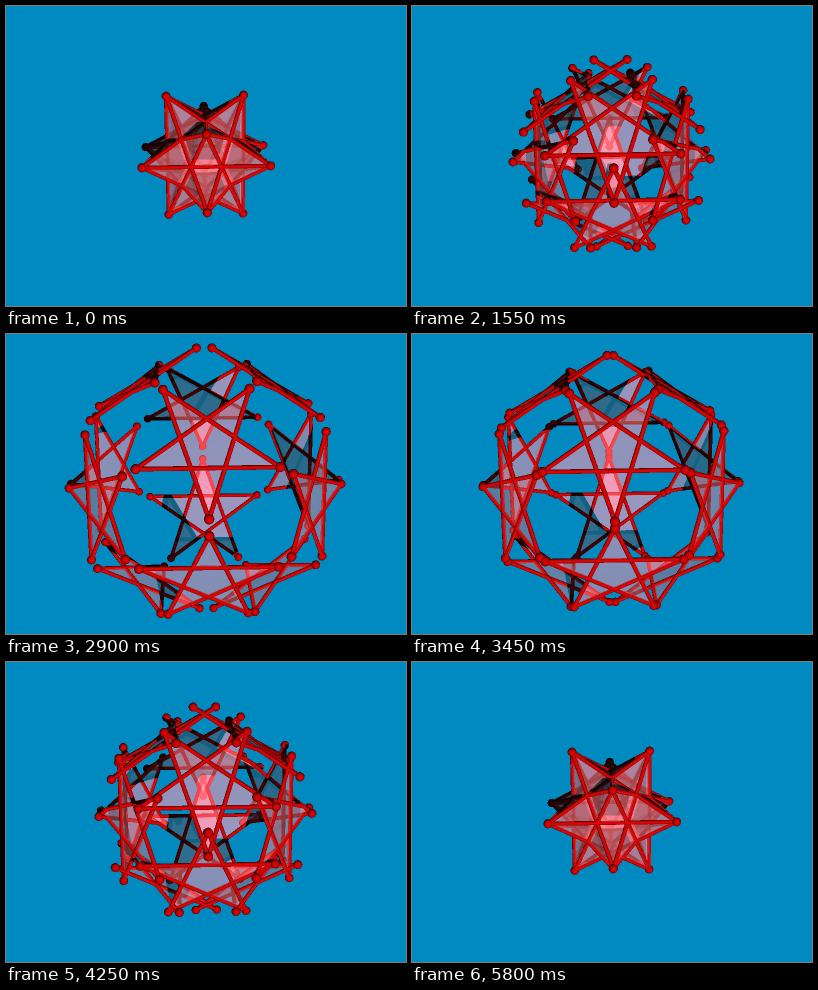
An HTML page with a canvas for the animation above (6100 ms loop, 400 px wide and 300 px high).

```html
<!DOCTYPE html>
<html lang="en">
<head>
<meta charset="utf-8">
<title>Exploding star polyhedron</title>
<style>
  html, body { margin: 0; width: 100%; height: 100%; overflow: hidden; background: #008ac0; }
  canvas { display: block; width: 400px; height: 300px; }
</style>
</head>
<body>
<canvas id="stage" width="400" height="300"></canvas>
<script>
const W = 400, H = 300, SS = 2;
const LOOP = 6100, HOLD = 300, STEP = 50, PEAK = 55;
const CX = 199.4, CY = 150, SIZE = 64.6, CAM = 12.3;
const TILT = 16 * Math.PI / 180, YAW = 0.02, ROLL = 0.015;
const ROD = 0.031, BALL = 0.067;
const INNER = Math.cos(72 * Math.PI / 180);
const BG = [0, 138, 192], RED = [228, 6, 6];
// Light scattered by a face, added to what shows through it
const GLOW = [20, 14, 14], DIFFUSE = [140, 57, 64];
const CLEAR = 0.6;

const dot = (a, b) => a[0] * b[0] + a[1] * b[1] + a[2] * b[2];
const unit = a => a.map(c => c / Math.sqrt(dot(a, a)));
const LAMP = [1.2, -1.5, 8];
const [LX, LY, LZ] = unit(LAMP);

// Tilt towards the viewer, then a slight yaw and roll.
function orient([x, y, z]) {
  const c = Math.cos(TILT), s = Math.sin(TILT);
  const y1 = y * c + z * s, z1 = z * c - y * s;
  return unit([x + YAW * z1 - ROLL * y1, y1 + ROLL * x, z1 - YAW * x]);
}

// The twelve face normals are the corners of an icosahedron.
const normals = [];
function addAxis(p) {
  const n = orient(p);
  normals.push(n, n.map(c => -c));
}
addAxis([0, 0, 1]);
for (let i = 0; i < 5; i++) {
  const a = (-90 + 72 * i) * Math.PI / 180, r = 2 / Math.sqrt(5);
  addAxis([r * Math.cos(a), r * Math.sin(a), 1 / Math.sqrt(5)]);
}

// Each face is a pentagram with unit circumradius around its normal.
const faces = normals.map(n => ({
  n,
  tips: normals
    .filter(p => Math.abs(dot(p, n) - 1 / Math.sqrt(5)) < 0.1)
    .map(p => unit(p.map((c, i) => c - n[i] * dot(p, n))))
}));
const flat = new Float64Array(faces.flatMap(f => [...f.n, ...f.tips.flat()]));
const STRIDE = 18, END = flat.length;

// 0 outside, 1 on the star, 2 on one of its edges
function starAt(o, x, y, z) {
  let out = 0, edge = false;
  for (let j = o + 3; j < o + STRIDE; j += 3) {
    const q = flat[j] * x + flat[j + 1] * y + flat[j + 2] * z - INNER;
    if (q > 0) out++;
    if (q < ROD && q > -ROD) edge = true;
  }
  return edge ? 2 : out < 2 ? 1 : 0;
}

// Share of the lamp's light that reaches a point
function lightAt(x, y, z, d) {
  const lx = LAMP[0] - x, ly = LAMP[1] - y, lz = LAMP[2] - z;
  let light = 1;
  for (let o = 0; o < END; o += STRIDE) {
    const a = flat[o], b = flat[o + 1], c = flat[o + 2];
    const s = (d - a * x - b * y - c * z) / (a * lx + b * ly + c * lz);
    if (!(s > 0.016 && s < 1)) continue;
    const px = x + s * lx, py = y + s * ly, pz = z + s * lz;
    if (px * px + py * py + pz * pz - d * d > 1) continue;
    const hit = starAt(o, px, py, pz);
    if (hit === 2) return 0;
    if (hit === 1) light *= 0.2;
  }
  return light;
}

const BW = W * SS, BH = H * SS, SCALE = SIZE * SS;
const depth = new Float64Array(BW * BH);
const shade = new Float64Array(BW * BH);
const buffer = document.createElement('canvas');
buffer.width = BW;
buffer.height = BH;
const bufferCtx = buffer.getContext('2d');
const image = bufferCtx.createImageData(BW, BH);

function project([x, y, z]) {
  const f = CAM / (CAM - z);
  return { x: CX * SS + x * f * SCALE, y: CY * SS - y * f * SCALE, f };
}

// Round-ended rod; a ball is a rod of no length.
function capsule(a, b, radius) {
  const dx = b.x - a.x, dy = b.y - a.y, len2 = dx * dx + dy * dy || 1;
  const pad = radius * SCALE * Math.max(a.f, b.f) + 1;
  const x0 = Math.max(0, Math.floor(Math.min(a.x, b.x) - pad));
  const x1 = Math.min(BW - 1, Math.ceil(Math.max(a.x, b.x) + pad));
  const y0 = Math.max(0, Math.floor(Math.min(a.y, b.y) - pad));
  const y1 = Math.min(BH - 1, Math.ceil(Math.max(a.y, b.y) + pad));
  for (let y = y0; y <= y1; y++) {
    for (let x = x0; x <= x1; x++) {
      const vx = x + 0.5 - a.x, vy = y + 0.5 - a.y;
      const h = Math.min(1, Math.max(0, (vx * dx + vy * dy) / len2));
      const f = a.f + (b.f - a.f) * h, r = radius * SCALE * f;
      const nx = (vx - dx * h) / r, ny = (vy - dy * h) / r;
      const n2 = nx * nx + ny * ny;
      if (n2 >= 1) continue;
      const nz = Math.sqrt(1 - n2), z = CAM - CAM / f + radius * nz;
      const i = y * BW + x;
      if (z <= depth[i]) continue;
      depth[i] = z;
      shade[i] = Math.max(0, nx * LX - ny * LY + nz * LZ);
    }
  }
}

function drawSolids(d) {
  depth.fill(-99);
  for (const { n, tips } of faces) {
    const pts = tips.map(t => project(t.map((c, i) => c + n[i] * d)));
    pts.forEach((p, i) => {
      capsule(p, p, BALL);
      for (let j = 0; j < i; j++) {
        if (dot(tips[i], tips[j]) < -0.5) capsule(p, pts[j], ROD);
      }
    });
  }
}

const hitT = new Float64Array(12), hitFace = new Int32Array(12);

// Star faces crossed in front of the solid layer, farthest first
function findFaces(u, v, d, limit) {
  let count = 0;
  for (let o = 0; o < END; o += STRIDE) {
    const c = flat[o + 2] * CAM;
    const t = (d - c) / (flat[o] * u + flat[o + 1] * v - c);
    if (!(t > 0 && t < limit)) continue;
    const x = u * t, y = v * t, z = CAM * (1 - t);
    if (x * x + y * y + z * z - d * d > 1 || !starAt(o, x, y, z)) continue;
    let i = count++;
    for (; i > 0 && hitT[i - 1] < t; i--) {
      hitT[i] = hitT[i - 1];
      hitFace[i] = hitFace[i - 1];
    }
    hitT[i] = t;
    hitFace[i] = o;
  }
  return count;
}

// Diffuse light on the side of a face that the camera sees
function faceLight(o, x, y, z, d) {
  const nx = flat[o], ny = flat[o + 1], nz = flat[o + 2];
  const side = nz * (CAM - z) - nx * x - ny * y < 0 ? -1 : 1;
  const lx = LAMP[0] - x, ly = LAMP[1] - y, lz = LAMP[2] - z;
  const lam = side * (nx * lx + ny * ly + nz * lz) / Math.hypot(lx, ly, lz);
  return lam > 0 ? (0.35 + 0.65 * lam) * lightAt(x, y, z, d) : 0;
}

function render(k) {
  const d = 0.5 + 0.0257 * k, px = image.data;
  drawSolids(d);
  for (let i = 0; i < px.length; i += 4) {
    px[i] = BG[0];
    px[i + 1] = BG[1];
    px[i + 2] = BG[2];
    px[i + 3] = 255;
  }
  const reach = (80 + 1.4 * k) * SS;
  const x0 = Math.max(0, Math.floor(CX * SS - reach)), x1 = Math.min(BW, CX * SS + reach);
  const y0 = Math.max(0, Math.floor(CY * SS - reach)), y1 = Math.min(BH, CY * SS + reach);
  for (let y = y0; y < y1; y++) {
    const v = (CY * SS - y - 0.5) / SCALE;
    for (let x = x0; x < x1; x++) {
      const u = (x + 0.5 - CX * SS) / SCALE, i = y * BW + x;
      const solid = depth[i] > -90;
      const limit = solid ? (CAM - depth[i]) / CAM : 9;
      const count = findFaces(u, v, d, limit);
      if (!solid && !count) continue;
      let [r, g, b] = BG;
      if (solid) {
        const lit = shade[i] && shade[i] * lightAt(u * limit, v * limit, depth[i], d);
        const m = 0.12 + 0.86 * lit;
        r = RED[0] * m;
        g = RED[1] * m;
        b = RED[2] * m;
      }
      for (let h = 0; h < count; h++) {
        const t = hitT[h];
        const m = faceLight(hitFace[h], u * t, v * t, CAM * (1 - t), d);
        r = r * CLEAR + GLOW[0] + DIFFUSE[0] * m;
        g = g * CLEAR + GLOW[1] + DIFFUSE[1] * m;
        b = b * CLEAR + GLOW[2] + DIFFUSE[2] * m;
      }
      px[i * 4] = r;
      px[i * 4 + 1] = g;
      px[i * 4 + 2] = b;
    }
  }
  bufferCtx.putImageData(image, 0, 0);
  const out = document.createElement('canvas');
  out.width = W;
  out.height = H;
  out.getContext('2d').drawImage(buffer, 0, 0, W, H);
  return out;
}

const cache = [];
const pose = k => cache[k] || (cache[k] = render(k));
const ctx = document.getElementById('stage').getContext('2d');
const start = performance.now();
let shown = -1;

function tick() {
  const t = (performance.now() - start) % LOOP;
  const step = Math.min(2 * PEAK, Math.max(0, Math.floor((t - HOLD) / STEP)));
  const k = PEAK - Math.abs(PEAK - step);
  if (k !== shown) {
    ctx.drawImage(pose(k), 0, 0);
    shown = k;
  } else if (k < PEAK) {
    pose(k + 1);
  }
  requestAnimationFrame(tick);
}
tick();
</script>
</body>
</html>
```
